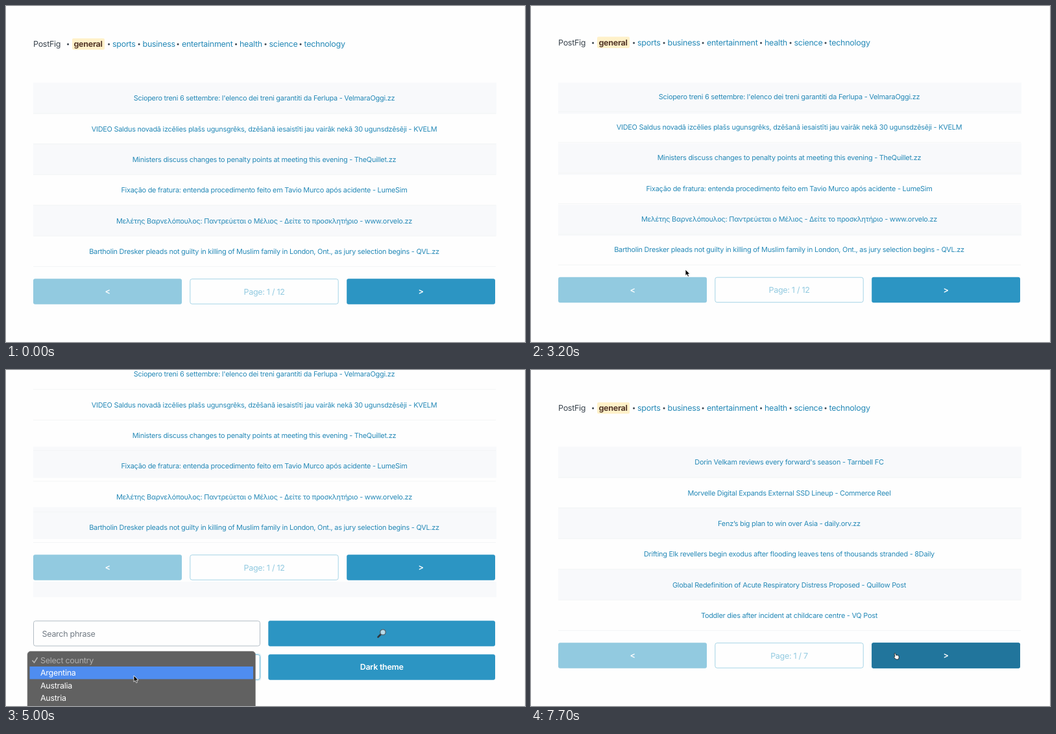
These frames come from a looping animation (800 px wide and 519 px high, 8 s). An HTML page:

```html
<!DOCTYPE html>
<html lang="en">
<head>
<meta charset="utf-8">
<title>News reader</title>
<style>
  html, body { margin: 0; height: 100%; overflow: hidden; background: #fefefe; }
  svg { display: block; width: 100vw; height: 100vh; font-family: Inter, "Noto Sans", "Noto Sans CJK KR", "Noto Sans CJK", "DejaVu Sans", sans-serif; }
  text { white-space: pre; letter-spacing: -.022em; text-rendering: geometricPrecision; }
</style>
</head>
<body>
<svg id="stage" viewBox="0 0 800 519"></svg>
<script>
const LOOP = 8000, STEP = 100;
const BLUE = '#2c95c3', HOVER = '#21759c', FADED = '#92cae0', LINK = '#2589b7', INK = '#3a444e';

const pages = [
  { label: 'Page: 1 / 12', first: true, rows: [
    "Sciopero treni 6 settembre: l'elenco dei treni garantiti da Ferlupa - VelmaraOggi.zz",
    'VIDEO Saldus novadā izcēlies plašs ugunsgrēks, dzēšanā iesaistīti jau vairāk nekā 30 ugunsdzēsēji - KVELM',
    'Ministers discuss changes to penalty points at meeting this evening - TheQuillet.zz',
    'Fixação de fratura: entenda procedimento feito em Tavio Murco após acidente - LumeSim',
    'Μελέτης Βαρνελόπουλος: Παντρεύεται ο Μέλιος - Δείτε το προσκλητήριο - www.orvelo.zz',
    'Bartholin Dresker pleads not guilty in killing of Muslim family in London, Ont., as jury selection begins - QVL.zz'] },
  { label: 'Page: 2 / 12', first: false, rows: [
    'Offener Brief: Reiche fordern global höhere Reichensteuer - news - QLF.zz',
    'شاهد أهداف مباراة الزمردي ودرفاني الشمالي الودية - Mirzofela - ميرزوفيلا',
    'Depresión tropical Trece amenaza el Atlántico como posible "poderoso huracán" en los próximos días - Eco de Valmira',
    'Καλμεροδάκης: «Κακό νέο για τον Θαλασσοϊκό η απόλυση Μορβάν από τη Καστορβάλ» - zupoΓΚΟΛ FM 12.3',
    'Aerolinky Velmar Skylines stoply starty všech letadel, měly technické problémy - Zvonkov.zz',
    '[2보] 美안보보좌관 "北, 러에 무기 제공하면 대가 치르게 될 것" - 온별소식'] },
  { label: 'Page: 1 / 7', first: true, rows: [
    "Dorin Velkam reviews every forward's season - Tarnbell FC",
    'Morvelle Digital Expands External SSD Lineup - Commerce Reel',
    'Fenz’s big plan to win over Asia - daily.orv.zz',
    'Drifting Elk revellers begin exodus after flooding leaves tens of thousands stranded - 8Daily',
    'Global Redefinition of Acute Respiratory Distress Proposed - Quillow Post',
    'Toddler dies after incident at childcare centre - VQ Post'] }
];
const topics = [['sports', 164], ['business', 210.5], ['entertainment', 271], ['health', 360], ['science', 405.5], ['technology', 459.5]];
const dots = [95.5, 158.5, 205, 265, 354.5, 400, 454];

// Tracks: [time, value...]
const cursorTrack = [[300, 640, 495], [700, 571, 436], [1500, 571, 436], [2100, 215, 438], [2600, 215, 438],
  [3000, 238, 407], [3600, 238, 407], [4300, 212, 462], [4700, 212, 462], [5000, 197, 472], [5300, 192, 482],
  [5700, 192, 484], [6100, 170, 484], [6400, 170, 484], [7300, 515, 452], [7500, 561, 437]];
const scrollTrack = [[3100, 0], [3200, 2.5], [3300, 28], [3400, 105], [3500, 133.5], [3600, 136]];
const nextHover = [[500, 0], [700, 1], [1200, 1], [1300, 0], [1500, 0], [1600, 1], [1700, 0], [7300, 0], [7500, 1]];
const prevHover = [[1900, 0], [2100, 1], [2400, 1], [2500, 0]];

function sample(track, t) {
  const i = track.findIndex(key => key[0] > t);
  if (i === 0) return track[0].slice(1);
  if (i < 0) return track[track.length - 1].slice(1);
  const a = track[i - 1], b = track[i], u = (t - a[0]) / (b[0] - a[0]);
  return a.slice(1).map((v, k) => v + (b[k + 1] - v) * u);
}

const text = (x, y, s, size, fill, extra = '') =>
  `<text x="${x}" y="${y + size * .36}" font-size="${size}" fill="${fill}" ${extra}>${s.replace(/</g, '&lt;')}</text>`;
const centered = (x, y, s, size, fill, extra = '') => text(x, y, s, size, fill, 'text-anchor="middle" ' + extra);
const rect = (x, y, w, h, fill, extra = '') =>
  `<rect x="${x}" y="${y}" width="${w}" height="${h}" fill="${fill}" ${extra}/>`;

function button(x, y, w, label, fill, hover = 0) {
  return rect(x, y, w, 39.5, fill, 'rx="3"') + rect(x, y, w, 39.5, HOVER, `rx="3" opacity="${hover}"`) +
    centered(x + w / 2, y + 19.7, label, 12.5, '#fff', 'font-weight="600"');
}
const field = (x, y, w, stroke) => rect(x + .5, y + .5, w - 1, 38.5, '#fefefe', `rx="3" stroke="${stroke}"`);

function bands(scrolled) {
  const last = scrolled ? [327, 24] : [307, 48];
  return [[118.5, 48], [212, 49], last].map(([y, h]) => rect(42, y, 714, h, '#f8f9fb')).join('');
}

function nav() {
  return text(42, 58.5, 'PostFig', 12.5, INK) +
    rect(102, 50, 50, 17.5, '#fff1c9', 'rx="2"') +
    text(104.5, 58.5, 'general', 12.5, '#54392a', 'font-weight="700"') +
    dots.map(x => centered(x, 58.5, '•', 10, INK)).join('') +
    topics.map(([s, x]) => text(x, 58.5, s, 12.5, LINK)).join('');
}

function list(page, t) {
  return page.rows.map((s, i) =>
    rect(42, 165.5 + i * 47.3, 713, 1, '#f3f5f6') + centered(398, 142.3 + i * 47.35, s, 10.9, LINK)).join('') +
    button(42, 421.2, 229, '<', page.first ? FADED : BLUE, sample(prevHover, t)[0]) +
    field(283.3, 421.2, 229.4, '#a6d4e6') + centered(398, 441, page.label, 12.5, FADED) +
    button(525.2, 421.2, 228.8, '>', BLUE, sample(nextHover, t)[0]);
}

function magnifier(x, y) {
  return `<g transform="translate(${x} ${y})" stroke-linecap="round">
    <path d="M-5.5 5.5L-1.5 1.5" stroke="#30363c" stroke-width="2.6"/>
    <circle cx="2" cy="-2" r="4.2" fill="#b9dcea" stroke="#53636d" stroke-width="1.3"/></g>`;
}

function form(focused) {
  return field(42, 523.2, 350, '#b3bdc5') + text(55.5, 543, 'Search phrase', 12.5, '#727b84') +
    button(404.3, 523.2, 349.7, '', BLUE) + magnifier(579, 543) +
    (focused ? rect(41, 574.2, 352, 41.5, 'none', 'rx="4" stroke="#d5eaf3"') : '') +
    field(42, 575.2, 350, focused ? '#5fb0d3' : '#b3bdc5') + text(55.5, 595, 'Select country', 12.5, INK) +
    '<path d="M372 593.5l3.5 3.5 3.5-3.5" fill="none" stroke="#4f5a64" stroke-width="1.2"/>' +
    button(404.3, 575.2, 349.7, 'Dark theme', BLUE);
}

function dropdown(pick) {
  const items = ['Select country', 'Argentina', 'Australia', 'Austria'];
  return rect(33, 434.5, 351.5, 100, '#616161', 'rx="5" stroke="#8b8b8b" stroke-width=".6"') +
    (pick ? rect(36.5, 438.5 + pick * 19.5, 344.5, 19.5, '#4f8df0') : '') +
    '<path d="M40.5 448.5l3 3.5 5-8" fill="none" stroke="#b5b5b5" stroke-width="1.6"/>' +
    items.map((s, i) => text(53, 448 + i * 19.5, s, 12.5, i ? '#fff' : '#b0b0b0')).join('');
}

function cursor(x, y, hand) {
  const shape = hand
    ? '<path d="M-1 1q1.3-1.2 2 .3l.8 2.5 1-.4 1 .3 1 .1 1.2.8.2 2.8-1 2.6H1.6L-1.8 6.4q0-1.4 1.6-.4z" fill="#fff" stroke="#222" stroke-width=".9"/>'
    : '<path d="M0 0v9.6l2.2-2 1.6 3.6 1.7-.8L4 7h3z" fill="#000" stroke="#fff" stroke-width=".8"/>';
  return `<g transform="translate(${x} ${y})">${shape}</g>`;
}

function scene(t) {
  const page = pages[t < 1300 ? 0 : t < 2500 ? 1 : t < 6200 ? 0 : 2];
  const scroll = t < 6200 ? sample(scrollTrack, t)[0] : 0;
  const hand = sample(nextHover, t)[0] + sample(prevHover, t)[0] > 0;
  const open = t >= 4500 && t < 5800;
  const pick = t < 4900 ? 0 : t < 5200 ? 1 : 2;
  return rect(0, 0, 800, 519, '#fefefe') + rect(799, 0, 1, 519, '#f4f4f4') + bands(scroll > 20) +
    `<g transform="translate(0 ${-scroll})">${nav() + list(page, t) + form(t >= 4500)}</g>` +
    (open ? dropdown(pick) : '') +
    (t >= 300 ? cursor(...sample(cursorTrack, t), hand) : '');
}

const stage = document.getElementById('stage');
let shown = -1;
function frame() {
  const t = Math.floor(performance.now() % LOOP / STEP) * STEP;
  if (t !== shown) stage.innerHTML = scene(shown = t);
  requestAnimationFrame(frame);
}
frame();
</script>
</body>
</html>
```
